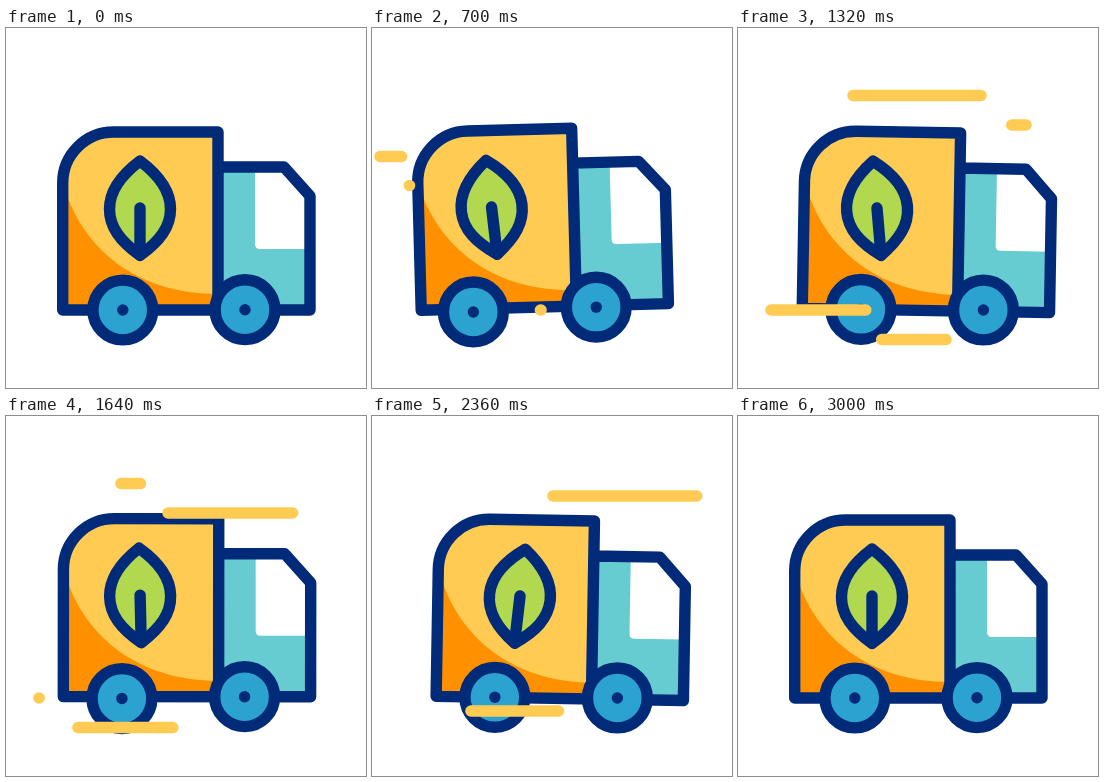
Recreate the animation shown at these times as an HTML page. Size 360 px wide and 360 px high, loop 3.02 s.

```html
<!DOCTYPE html>
<html lang="en">
<head>
<meta charset="utf-8">
<title>Eco delivery truck</title>
<style>
  html, body { margin: 0; width: 100%; height: 100%; overflow: hidden; background: #fff; }
  svg { display: block; width: 100%; height: 100%; }
  .ink { stroke: #012a78; stroke-width: 11.4; stroke-linecap: round; stroke-linejoin: round; }
  #wind { stroke: #ffcb52; stroke-width: 11.6; stroke-linecap: round; }
</style>
</head>
<body>
<svg viewBox="0 0 360 360">
  <defs>
    <g id="wheel">
      <circle class="ink" r="29.9" fill="#2ba2d0"/>
      <circle r="5.7" fill="#012a78"/>
    </g>
  </defs>
  <g id="body">
    <path d="M212 139H278L304 168V282H212Z" fill="#66ccd2"/>
    <path d="M249 139H278L304 168V221H254Q249 221 249 216Z" fill="#fff"/>
    <path d="M56.7 282V155A51 51 0 0 1 107.7 104H212V282Z" fill="#ffcb52"/>
    <path d="M57 155C75 220 130 266 212 266V282H57Z" fill="#ff9100"/>
    <path class="ink" fill="none" d="M212 282V104H107.7A51 51 0 0 0 56.7 155V282H304V168L278 139H212"/>
  </g>
  <g id="leaf">
    <path class="ink" fill="#b1d84e" d="M0 -47C20 -32 30.5 -17 30.5 1S20 33 0 47.5C-20 33 -30.5 19 -30.5 1S-20 -32 0 -47Z"/>
    <path class="ink" d="M0 0V47"/>
  </g>
  <use id="rear" href="#wheel"/>
  <use id="front" href="#wheel"/>
  <g id="wind"></g>
</svg>
<script>
const LOOP = 3020, REST = 300, STEP = 540, TRIM = 520;

// Offsets [x, y, degrees] at each sway stop; the first and last stops are at rest.
const still = [0, 0, 0];
const sway = (...stops) => [still, ...stops, still];
const parts = [
  { id: 'body', x: 180, y: 193, local: true,
    poses: sway([-10.3, -3.1, -1.6], [9.1, .5, 1], [-10.2, -3.6, -1.2], [9.1, .5, 1]) },
  { id: 'leaf', x: 134, y: 180,
    poses: sway([-15, -1, -7], [5, 0, -4.9], [-6.2, -2, 3.3], [14.2, 0, 6.6]) },
  { id: 'rear', x: 116.8, y: 282,
    poses: sway([-16, 2, 0], [6.2, -.6, 0], [-10, 2, 0], [6.2, -.7, 0]) },
  { id: 'front', x: 239, y: 281.7,
    poses: sway([-15.3, -2.7, 0], [6.4, .3, 0], [-9.2, -2.7, 0], [6.5, .3, 0]) },
].map(part => ({ ...part, node: document.getElementById(part.id) }));

// Streaks grow leftwards from x, then their right end catches up after the lag.
const streak = (x, y, length, start, lag, trim = TRIM) => {
  const node = document.createElementNS('http://www.w3.org/2000/svg', 'line');
  node.setAttribute('y1', y);
  node.setAttribute('y2', y);
  document.getElementById('wind').append(node);
  return { node, x, length, start, lag, trim };
};
const streaks = [
  streak(40, 128.5, 32, 300, 300, 260),
  streak(37.5, 157.5, 30, 690, 300, 260),
  streak(249, 67.5, 134, 808, 442),
  streak(169, 282, 136, 680, 448),
  streak(288, 97, 136, 1212, 395),
  streak(208, 311.5, 136, 1070, 378),
  streak(336, 80, 160, 1900, 372),
  streak(256, 295, 157, 1742, 378),
];

const clamp = u => Math.min(1, Math.max(0, u));
const easeSine = u => (1 - Math.cos(Math.PI * clamp(u))) / 2;
const easeQuart = u => u < .5 ? 8 * u ** 4 : 1 - 8 * (1 - u) ** 4;

function drawPart({ node, x, y, local, poses }, t) {
  const progress = Math.min(5, Math.max(0, (t - REST) / STEP));
  const i = Math.min(4, Math.floor(progress));
  const k = easeQuart(progress - i);
  const [dx, dy, angle] = poses[i].map((v, n) => v + (poses[i + 1][n] - v) * k);
  const back = local ? ` translate(${-x} ${-y})` : '';
  node.setAttribute('transform', `translate(${x + dx} ${y + dy}) rotate(${angle})${back}`);
}

function drawStreak({ node, x, length, start, lag, trim }, t) {
  const age = t - start;
  node.style.display = age >= 0 && age < lag + trim ? '' : 'none';
  node.setAttribute('x1', x - length * easeSine(age / trim));
  node.setAttribute('x2', x - length * easeSine((age - lag) / trim));
}

function draw(now) {
  const t = now % LOOP;
  parts.forEach(part => drawPart(part, t));
  streaks.forEach(line => drawStreak(line, t));
  requestAnimationFrame(draw);
}
draw(0);
</script>
</body>
</html>
```
